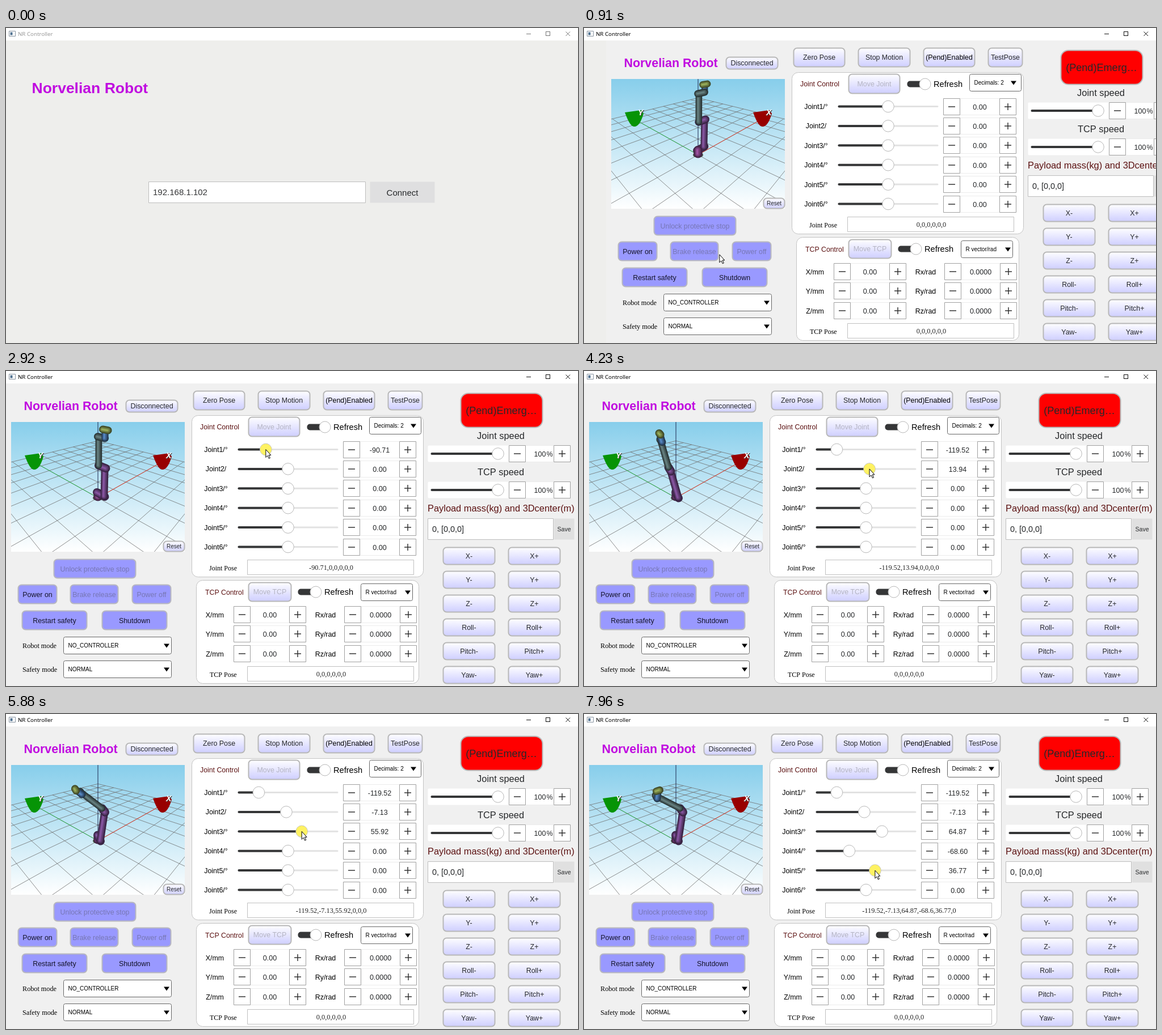
These frames come from a looping animation (1008x556 px, 8000 ms). An HTML page with a canvas:

```html
<!DOCTYPE html>
<html>
<head>
<meta charset="utf-8">
<title>NR Controller</title>
<style>
  html, body { margin: 0; width: 100%; height: 100%; overflow: hidden; background: #eeeeec; }
  canvas { display: block; }
</style>
</head>
<body>
<canvas id="stage" width="1008" height="556"></canvas>
<script>
const ctx = document.getElementById('stage').getContext('2d');
const SANS = '"Liberation Sans", Arial, sans-serif';
const SERIF = '"Liberation Serif", Times, serif';
const INK = '#26282a', MAROON = '#5c1212', PURPLE = '#c00be0';
const LOOP = 8000, SIZE = 12.4;
const SLIDE = { start: 646.5, length: 400 };
const CLICK = { start: 540, end: 640 };

// Slider drags in order; each starts from the angle the joint already has
const DRAGS = [
  { joint: 0, start: 2200, end: 3150, to: -119.52 },
  { joint: 1, start: 3620, end: 4230, to: 13.94 },
  { joint: 1, start: 4330, end: 4700, to: 75 },
  { joint: 1, start: 4700, end: 5060, to: -7.13 },
  { joint: 2, start: 5450, end: 5950, to: 64.87 },
  { joint: 3, start: 6577, end: 7110, to: -68.6 },
  { joint: 4, start: 7680, end: 7960, to: 36.77 }
];
const clamp = v => Math.min(1, Math.max(0, v));
const rowY = i => 138.5 + 34.4 * i;
const knobX = angle => 497 + angle * .432;

function jointAngles(t) {
  const angles = Array(6).fill(0);
  for (const { joint, start, end, to } of DRAGS)
    angles[joint] += (to - angles[joint]) * clamp((t - start) / (end - start));
  return angles;
}

// The pointer visits these stops; every drag adds its two ends
const stops = [
  { t: 130, x: 800, y: 540 },
  { t: CLICK.start, x: 698, y: 292 }, { t: CLICK.end, x: 698, y: 292 },
  { t: 750, x: 190, y: 421 }, { t: 1440, x: 544, y: 268 }
];
for (const { joint, start, end } of DRAGS)
  for (const t of [start, end])
    stops.push({ t, x: knobX(jointAngles(t)[joint]), y: rowY(joint), drag: t === end });

function pointerAt(t) {
  const i = stops.findIndex(s => s.t > t);
  if (i < 0) return stops[stops.length - 1];
  const a = stops[i - 1], b = stops[i], u = (t - a.t) / (b.t - a.t);
  const k = b.drag ? u : u * u * (3 - 2 * u);
  return { x: a.x + (b.x - a.x) * k, y: a.y + (b.y - a.y) * k };
}

// Drawing helpers
function text(s, x, y, size = SIZE, color = INK, align = 'center', family = SANS, style = '') {
  ctx.font = `${style} ${size}px ${family}`;
  ctx.fillStyle = color;
  ctx.textAlign = align;
  ctx.fillText(s, x, y);
}
const label = (s, x, y, size, color = '#000', family = SANS, style = '') =>
  text(s, x, y, size, color, 'left', family, style);

function box(x, y, x2, y2, fill, border, radius = 0, line = 1) {
  ctx.beginPath();
  ctx.roundRect(x + .5, y + .5, x2 - x - 1, y2 - y - 1, radius);
  ctx.fillStyle = fill;
  ctx.fill();
  if (!border) return;
  ctx.strokeStyle = border;
  ctx.lineWidth = line;
  ctx.stroke();
}
function path(points, color, width = 1, close = false) {
  ctx.beginPath();
  points.forEach(p => ctx.lineTo(p[0], p[1]));
  if (close) ctx.closePath();
  ctx.strokeStyle = color;
  ctx.lineWidth = width;
  ctx.stroke();
}
function shape(points, color) {
  ctx.beginPath();
  points.forEach(p => ctx.lineTo(p[0], p[1]));
  ctx.fillStyle = color;
  ctx.fill();
}
function disc(x, y, r, fill, border) {
  ctx.beginPath();
  ctx.arc(x, y, r, 0, 7);
  ctx.fillStyle = fill;
  ctx.fill();
  if (!border) return;
  ctx.strokeStyle = border;
  ctx.lineWidth = 1;
  ctx.stroke();
}
function shifted(dx, draw) {
  ctx.save();
  ctx.translate(dx, 0);
  draw();
  ctx.restore();
}

// Widgets
function button(s, x, y, x2, y2, color = INK, size = SIZE) {
  const shade = ctx.createLinearGradient(0, y, 0, y2);
  shade.addColorStop(0, '#ffffff');
  shade.addColorStop(.25, '#f2f2ff');
  shade.addColorStop(1, '#ceceff');
  box(x, y, x2, y2, shade, '#b8b8b8', 6, 2);
  text(s, (x + x2) / 2, (y + y2) / 2 + size * .36, size, color);
}
function blueButton(s, x, y, width, enabled) {
  box(x, y, x + width, y + 34, '#9999ff', '#b8b8c0', 6, 2);
  text(s, x + width / 2, y + 21.5, SIZE, enabled ? '#15152a' : '#7777b4');
}
function combo(s, x, y, width, inset) {
  box(x, y, x + width, y + 31, '#fff', '#666', 3);
  label(s, x + 8.5, y + 19, 10);
  const cx = x + width - inset, cy = y + 15.5;
  shape([[cx - 5, cy - 3], [cx + 5, cy - 3], [cx, cy + 4]], '#000');
}
function spin(s, x, y, x2, mid) {
  box(x, y - 15, x2, y + 15, '#fff', '#ececec');
  for (const left of [x, x2 - 30]) {
    const c = left + 15;
    box(left, y - 15, left + 30, y + 15, '#fff', '#a0a0a0');
    path([[c - 6, y], [c + 6, y]], '#333', 1.5);
    if (left > x) path([[c, y - 6], [c, y + 6]], '#333', 1.5);
  }
  text(s, mid, y + 4.5, 12.5);
}
function slider(x, x2, knob, y) {
  box(x, y - 2, x2, y + 2, '#e2e2e2', null, 2);
  box(x, y - 2.5, knob, y + 2.5, '#353637', null, 2);
  disc(knob, y, 10.3, '#fff', '#b8b8b8');
}
function toggle(x, y) {
  box(x, y - 6, x + 40, y + 6, '#353637', null, 5);
  disc(x + 32, y, 10, '#fff', '#b8b8b8');
  label('Refresh', x + 47, y + 5, 14.6);
}
function poseField(name, x, y, value) {
  label(name, x, y + 5, 12, '#000', SERIF);
  box(425, y - 14, 719, y + 13, '#fff', '#c0c0c0');
  text(value, 573, y + 4, 12.3, '#222', 'center', SERIF);
}

// 3D view: camera pitched 30 degrees, distance 1 from the base
function project([x, y, z]) {
  const right = (x - y) * Math.SQRT1_2, away = (x + y) * Math.SQRT1_2;
  const depth = 1 + away * .866 - z * .5;
  return [162 + 276 * right / depth,
          204.5 - 276 * (away * .5 + z * .866 - .07) / depth, depth];
}
const move = (p, dir, k) => p.map((v, i) => v + dir[i] * k);
const blend = (a, b, angle) => a.map((v, i) => v * Math.cos(angle) + b[i] * Math.sin(angle));

function limb(from, to, radius, color) {
  const a = project(from), b = project(to), depth = (a[2] + b[2]) / 2;
  return { a, b, depth, color, width: 2 * radius * 276 / depth };
}
function drawLimb({ a, b, color, width }) {
  ctx.lineCap = 'round';
  for (let i = 0; i < 4; i++) {
    const rgb = color.map(c => Math.min(255, c * (.55 + .25 * i)) | 0), dx = -.45 * i;
    path([[a[0] + dx, a[1]], [b[0] + dx, b[1]]], `rgb(${rgb})`, width * (1 - .27 * i));
  }
  ctx.lineCap = 'butt';
}
function drawArm(angles) {
  const q = angles.map(d => d * Math.PI / 180), up = [0, 0, 1];
  const axis = [Math.cos(q[0]), Math.sin(q[0]), 0];
  const side = [Math.sin(q[0]), -Math.cos(q[0]), 0];
  const lean = angle => blend(up, side, angle);
  const hand = q[1] + q[2] + q[3];
  const tool = blend(axis, lean(hand + Math.PI / 2), q[4]);
  const shoulder = [0, 0, .037];
  const upper = move(shoulder, axis, .054);
  const elbow = move(upper, lean(q[1]), .186);
  const fore = move(elbow, axis, -.048);
  const wrist = move(fore, lean(q[1] + q[2]), .158);
  const cuff = move(wrist, axis, .044);
  const tip = move(cuff, lean(hand), .04);
  const base = [122, 64, 124], purple = [104, 66, 124], slate = [78, 98, 98];
  const limbs = [
    limb([0, 0, .008], shoulder, .027, base),
    limb(move(shoulder, axis, -.01), move(upper, axis, .006), .025, purple),
    limb(upper, elbow, .021, purple),
    limb(move(elbow, axis, .008), fore, .023, purple),
    limb(fore, wrist, .018, slate),
    limb(move(wrist, axis, -.008), cuff, .019, slate),
    limb(cuff, tip, .017, [66, 104, 150]),
    limb(move(tip, tool, -.016), move(tip, tool, .02), .018, [118, 134, 70])
  ];
  ctx.beginPath();
  ctx.ellipse(162, 224, 9, 5, 0, 0, 7);
  ctx.fillStyle = '#47574b';
  ctx.fill();
  limbs.sort((a, b) => b.depth - a.depth).forEach(drawLimb);
}
function drawCone(x, color, name) {
  ctx.beginPath();
  ctx.moveTo(x - 17, 149);
  ctx.lineTo(x + 12, 145);
  ctx.lineTo(x + 16, 151);
  ctx.quadraticCurveTo(x + 9, 175, x - 1, 174);
  ctx.quadraticCurveTo(x - 8, 174, x - 17, 149);
  ctx.fillStyle = color;
  ctx.fill();
  label(name, x + 7, 155, 14, '#444', SANS, 'italic bold');
  label(name, x + 6, 154, 14, '#fff', SANS, 'italic bold');
}
function drawView(angles) {
  ctx.save();
  ctx.beginPath();
  ctx.rect(9, 90, 306, 229);
  ctx.clip();
  const sky = ctx.createLinearGradient(0, 90, 0, 319);
  sky.addColorStop(0, '#87ceeb');
  sky.addColorStop(1, '#ffffff');
  ctx.fillStyle = sky;
  ctx.fillRect(9, 90, 306, 229);
  const cell = .15, reach = cell * 7;
  for (let c = -reach; c < reach + .01; c += cell) {
    const start = Math.max(-reach, -1.3 - c);
    path([project([start, c, 0]), project([reach, c, 0])], '#707272', .8);
    path([project([c, start, 0]), project([c, reach, 0])], '#707272', .8);
  }
  const origin = project([0, 0, 0]);
  path([origin, project([.9, 0, 0])], '#e03c28');
  path([origin, project([0, .9, 0])], '#2cb04a');
  path([origin, [162, 90]], '#1c2850');
  drawCone(50, '#069406', 'Y');
  drawCone(276, '#980000', 'X');
  drawArm(angles);
  ctx.restore();
  button('Reset', 277, 300, 315, 319, INK, 10);
}

// Pages
function drawLogin(t) {
  const pressed = t > CLICK.start && t < CLICK.end;
  label('Norvelian Robot', 45.5, 115, 26.5, PURPLE, SANS, 'bold');
  box(251, 271, 634, 309, '#fff', '#bdbdbd');
  label('192.168.1.102', 259, 295, 15, '#353637');
  box(641, 271, 756, 309, pressed ? '#cfcfd1' : '#dfdfe0');
  text('Connect', 698.5, 295.5, 15);
}
function drawLeft(angles) {
  label('Norvelian Robot', 31.5, 69, 21.4, PURPLE, SANS, 'bold');
  button('Disconnected', 211, 51, 303, 73);
  drawView(angles);
  blueButton('Unlock protective stop', 84, 332, 145);
  blueButton('Power on', 21, 377, 69, true);
  blueButton('Brake release', 113, 377, 85);
  blueButton('Power off', 222, 377, 69);
  blueButton('Restart safety', 28, 423, 115, true);
  blueButton('Shutdown', 169, 423, 115, true);
  [['Robot mode', 'NO_CONTROLLER'], ['Safety mode', 'NORMAL']].forEach(([name, value], i) => {
    label(name, 29, 489 + 42 * i, 12.2, '#000', SERIF);
    combo(value, 101, 469 + 42 * i, 191, 9);
  });
}
function drawMiddle(angles) {
  button('Zero Pose', 330, 35, 421, 69);
  button('Stop Motion', 444, 35, 536, 69);
  button('(Pend)Enabled', 559, 35, 650, 69, '#000');
  button('TestPose', 673, 35, 734, 69);

  box(327, 78, 736, 364, '#fff', '#c4c4c4', 11);
  label('Joint Control', 342, 103, 12.3, MAROON);
  button('Move Joint', 427, 81, 518, 116, '#b4b4c2');
  toggle(530, 99);
  combo('Decimals: 2', 640, 81, 92, 14);
  angles.forEach((angle, i) => {
    const y = rowY(i);
    text(`Joint${i + 1}/${i === 1 ? '' : '°'}`, 370, y + 4.5, SIZE, '#000');
    slider(408, 586, knobX(angle), y);
    spin(angle.toFixed(2), 594, Math.round(y), 723, 658.5);
  });
  poseField('Joint Pose', 358, 347, angles.map(v => +v.toFixed(2)).join());

  box(335, 369, 728, 552, '#fff', '#c4c4c4', 11);
  label('TCP Control', 351, 395, 12.3, MAROON);
  button('Move TCP', 427, 373, 503, 407, '#b4b4c2');
  toggle(514, 390);
  combo('R vector/rad', 625, 375, 92, 9);
  ['X', 'Y', 'Z'].forEach((name, i) => {
    const y = Math.round(430 + 34.4 * i);
    text(name + '/mm', 368, y + 4.5, SIZE, '#000');
    spin('0.00', 401, y, 529, 465);
    text(`R${name.toLowerCase()}/rad`, 563, y + 4.5, SIZE, '#000');
    spin('0.0000', 596, y, 724, 660);
  });
  poseField('TCP Pose', 359, 535, '0,0,0,0,0,0');
}
function drawRight() {
  box(801, 39, 946, 100, '#f00', '#b8b8b8', 13, 2);
  text('(Pend)Emerg…', 873, 76, 18.1);
  ['Joint speed', 'TCP speed'].forEach((name, i) => {
    const y = 146 + 64 * i;
    text(name, 872, y - 26, 16.4);
    box(743, y - 15, 995, y + 15, '#fff', null, 2);
    slider(748, 877, 867, y);
    spin('100\u200a%', 886, y, 995, 947);
  });
  label('Payload mass(kg) and 3Dcenter(m)', 743, 248, 16.4, MAROON);
  box(743, 260, 965, 298, '#fff', '#bdbdbd');
  label('0, [0,0,0]', 751, 284, 14.4, INK);
  box(965, 260, 1002, 298, '#e0e0e0');
  text('Save', 983.5, 283, 10.5);
  ['X', 'Y', 'Z', 'Roll', 'Pitch', 'Yaw'].forEach((name, i) => {
    const y = Math.round(311 + 42 * i);
    button(name + '-', 770, y, 862, y + 31);
    button(name + '+', 885, y, 977, y + 31);
  });
}
function drawTitleBar(active) {
  const line = active ? '#111' : '#777';
  ctx.fillStyle = '#fff';
  ctx.fillRect(0, 0, 1008, 22);
  box(5, 5, 17, 15, '#fff', '#8793a0');
  box(7, 7, 12, 13, '#4f7190');
  label('NR Controller', 21, 14, 9.7, active ? '#000' : '#999', '"Noto Sans", "Open Sans", sans-serif');
  path([[917, 10.5], [925, 10.5]], line);
  ctx.strokeRect(951.5, 6.5, 7, 7);
  path([[986.5, 6.5], [994, 14]], line);
  path([[994, 6.5], [986.5, 14]], line);
}
function drawPointer(t) {
  if (t < stops[0].t) return;
  const { x, y } = pointerAt(t);
  if ([CLICK, ...DRAGS].some(({ start, end }) => t >= start - 30 && t <= end + 20))
    disc(x, y, 10, 'rgba(255,240,70,.85)');
  const arrow = [[0, 0], [0, 14], [3, 11], [5.5, 16], [7.5, 15], [5.2, 10], [9, 10]]
    .map(([dx, dy]) => [x + dx, y + dy]);
  shape(arrow, '#fff');
  path(arrow, '#000', 1, true);
}

function render(t) {
  const left = 1 - clamp((t - SLIDE.start) / SLIDE.length);
  const offset = Math.round(1008 * left ** 3);
  ctx.fillStyle = '#eeeeec';
  ctx.fillRect(0, 0, 1008, 556);
  if (offset > 0) shifted(offset - 1008, () => drawLogin(t));
  if (offset < 1008) shifted(offset, () => {
    const angles = jointAngles(t);
    ctx.fillStyle = '#f0f0f0';
    ctx.fillRect(0, 22, 1008, 534);
    drawLeft(angles);
    drawMiddle(angles);
    drawRight();
  });
  drawTitleBar(t >= 130);
  drawPointer(t);
}

const begin = performance.now();
function tick() {
  render((performance.now() - begin) % LOOP);
  requestAnimationFrame(tick);
}
tick();
</script>
</body>
</html>
```
